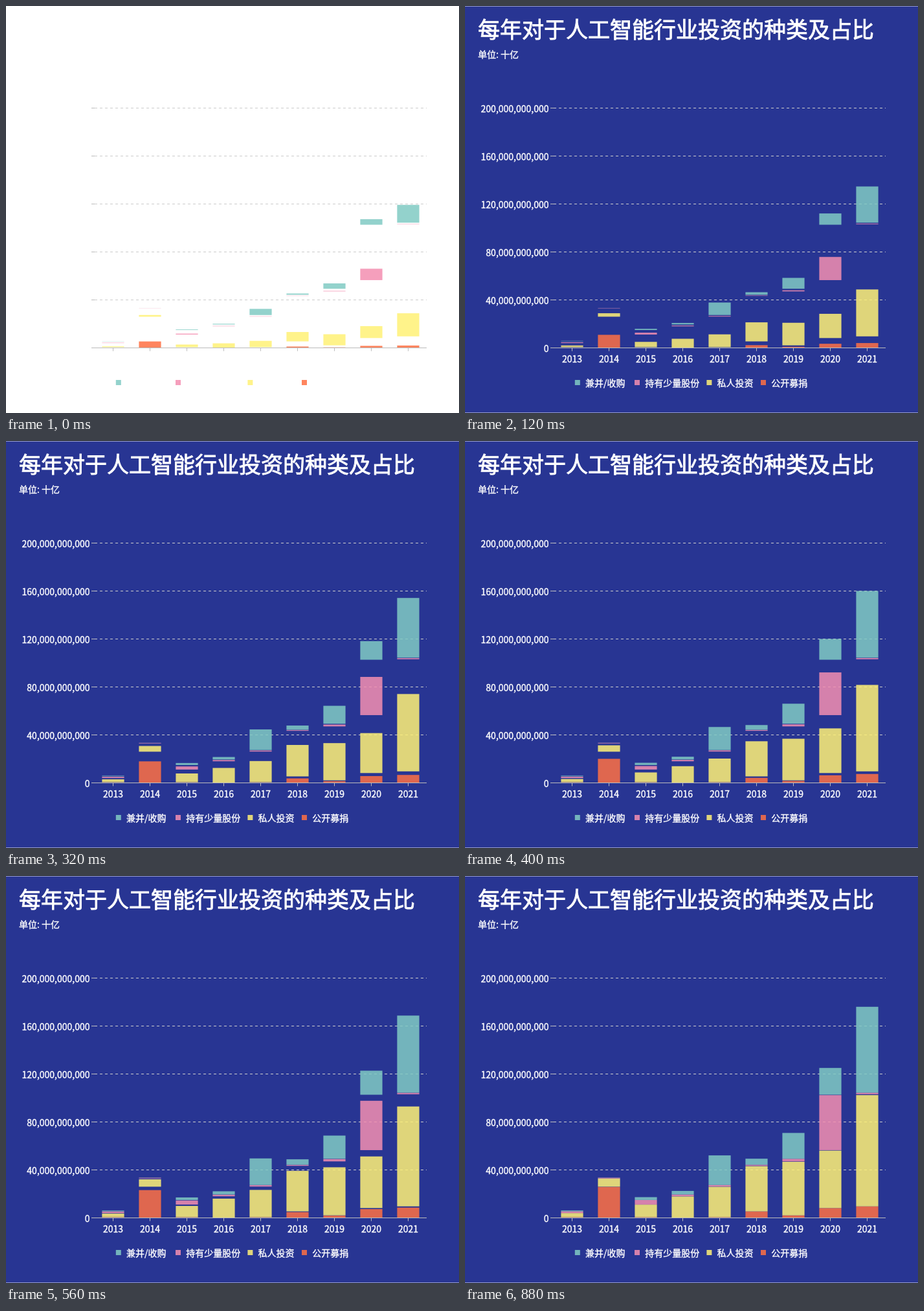
Write an HTML page with a canvas that moves like this. It is 700 by 628 pixels and loops after 2.88 s.

```html
<!DOCTYPE html>
<html lang="zh-CN">
<head>
<meta charset="utf-8">
<style>
html, body { margin: 0; width: 700px; height: 628px; overflow: hidden; background: #fff; }
canvas { display: block; }
</style>
</head>
<body>
<canvas id="chart" width="700" height="628"></canvas>
<script>
const ctx = document.getElementById('chart').getContext('2d');
const LOOP = 2880, STEP = 40, END = 880;
const LEFT = 137, RIGHT = 650, BASE = 527.5, ROW = 74, COL = 57, BAR = 34.2;
const PX = ROW / 40; // pixels per billion
const FONT = '"Noto Sans CJK SC", "Noto Sans CJK", "Noto Sans CJK JP", sans-serif';

// Stacked from the bottom up; yearly amounts in billions, x places the legend entry
const series = [
  { name: '公开募捐', color: '#ff7043', x: 457, data: [.6, 26, .6, .1, .6, 5.4, 2.1, 8.2, 9.6] },
  { name: '私人投资', color: '#fff176', x: 373.4, data: [3.4, 6.9, 10.5, 17.9, 25.5, 38, 45, 48.3, 93.5] },
  { name: '持有少量股份', color: '#f48fb1', x: 262, data: [1.5, .6, 3.8, 1.5, 1.3, .9, 2.2, 46.2, 1.3] },
  { name: '兼并/收购', color: '#80cbc4', x: 169.8, data: [.7, .1, 2.4, 3, 24.9, 5.1, 21.7, 22.5, 72.2] }
];

// Cubic ease-out, already under way when the loop starts
function growth(ms) {
  const s = ms / 1000;
  const p = .074 + .75 * s + .09 * s * s;
  return 1 - (1 - p) ** 3;
}

// A thin outline gives the regular face a medium weight
function text(str, x, y, align = 'left', size = 14) {
  ctx.font = `${size}px ${FONT}`;
  ctx.textAlign = align;
  ctx.fillStyle = ctx.strokeStyle = '#fff';
  ctx.lineWidth = size * .026;
  ctx.setLineDash([]);
  ctx.fillText(str, x, y);
  ctx.strokeText(str, x, y);
}

function line(x1, y1, x2, y2, color, dash = []) {
  ctx.strokeStyle = color;
  ctx.lineWidth = 1;
  ctx.setLineDash(dash);
  ctx.beginPath();
  ctx.moveTo(x1, y1);
  ctx.lineTo(x2, y2);
  ctx.stroke();
}

function box(x, y, w, h, color) {
  ctx.globalAlpha = .85;
  ctx.fillStyle = color;
  ctx.fillRect(x, y, w, h);
  ctx.globalAlpha = 1;
}

function drawAxes() {
  for (let i = 0; i <= 5; i++) {
    const y = BASE - i * ROW;
    text((i * 40e9).toLocaleString('en-US'), 129.5, y + 6, 'right');
    line(LEFT - 5, y, LEFT, y, '#bbb');
    if (i) line(LEFT, y, RIGHT, y, '#ccc', [4, 4]);
  }
}

function drawStack(year, grow) {
  const mid = LEFT + COL * (year + .5);
  let low = BASE;
  for (const { data, color } of series) {
    const full = data[year] * PX;
    box(mid - BAR / 2, low - full * grow, BAR, full * grow, color);
    low -= full;
  }
  line(mid, BASE, mid, BASE + 5, '#bbb');
  text(String(2013 + year), mid, 550, 'center');
}

function draw(ms) {
  ctx.fillStyle = '#fff';
  ctx.fillRect(0, 0, 700, 628);
  if (ms > 0) {
    ctx.fillStyle = '#283593';
    ctx.fillRect(0, .5, 700, 627);
  }
  text('每年对于人工智能行业投资的种类及占比', 20, 48.8, 'left', 34);
  text('单位: 十亿', 20, 80);
  drawAxes();
  for (let year = 0; year < 9; year++) drawStack(year, growth(ms));
  line(LEFT, BASE, RIGHT, BASE, '#bbb');
  for (const { name, color, x } of series) {
    box(x, 577, 8, 8, color);
    text(name, x + 16.2, 586.6);
  }
}

function tick() {
  const ms = performance.now() % LOOP;
  draw(Math.min(END, Math.floor(ms / STEP) * STEP));
  requestAnimationFrame(tick);
}
tick();
</script>
</body>
</html>
```
